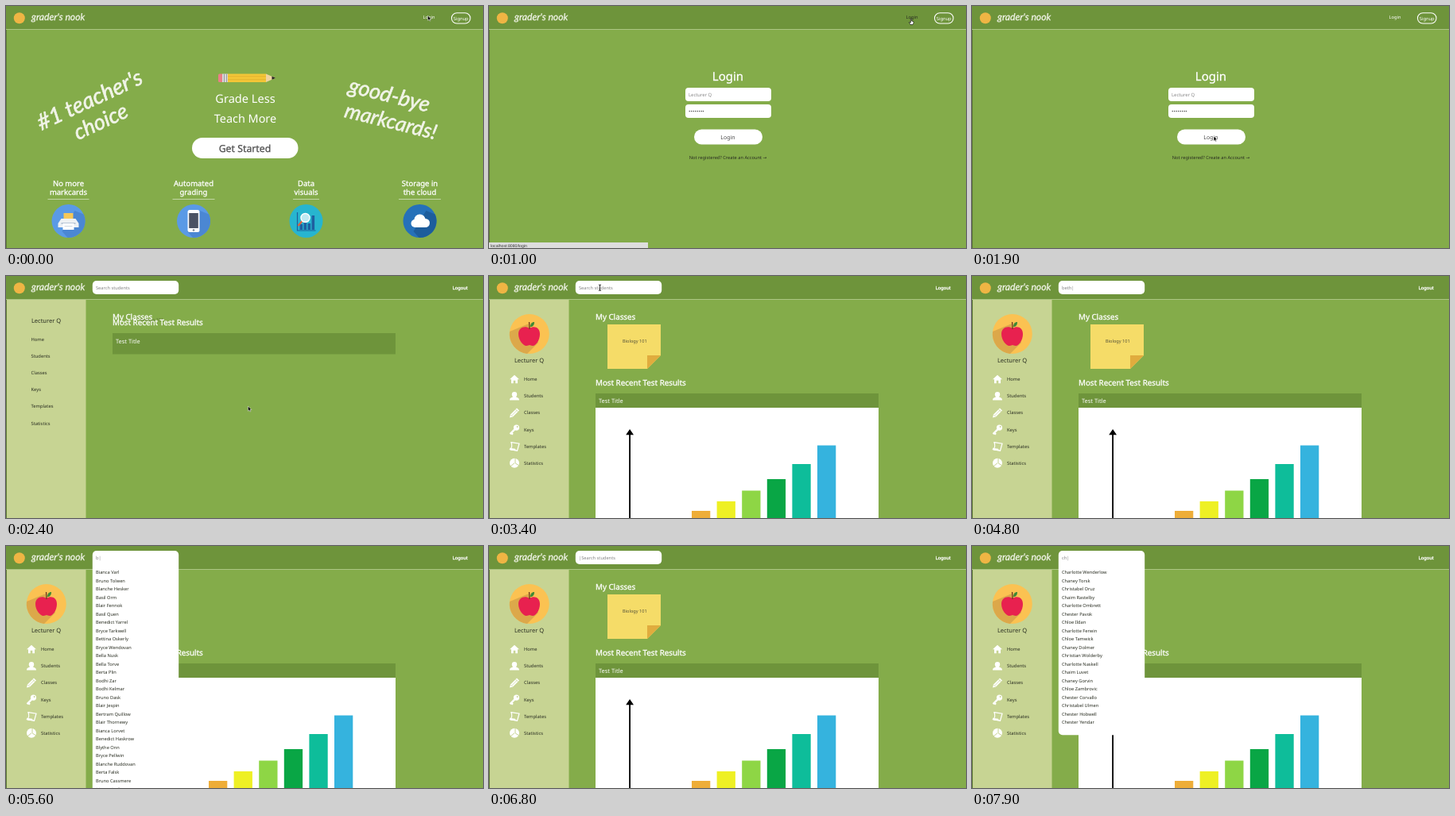
Write an HTML page that moves like this. It is 600 px wide and 305 px high and loops after 8000 ms.

```html
<!DOCTYPE html>
<html lang="en">
<head>
<meta charset="utf-8">
<title>Grading app walkthrough</title>
<style>
  html, body { margin: 0; width: 100%; height: 100%; overflow: hidden; background: #84ac4a; }
  svg { display: block; width: 100vw; height: 100vh; }
  text { font-family: "Noto Sans", "Open Sans", sans-serif; white-space: pre; text-rendering: geometricPrecision; }
  .hand { font-family: "Lato", cursive; font-style: italic; fill: #f1f4e8; stroke: #f1f4e8; stroke-width: .025em; }
  .mid { text-anchor: middle; }
  .firm { stroke: #fff; stroke-width: .3px; }
</style>
</head>
<body>
<svg id="stage" viewBox="0 0 600 305" preserveAspectRatio="none"></svg>
<script>
const LOOP = 8000;
const LOGIN_AT = 700, DASHBOARD_AT = 2200, LOADED_AT = 2700;
const HEADER = "#6e943b", INK = "#2a2e22", GREY = "#858585";
const stage = document.getElementById("stage");

const students = (
  "Bianca Varl,Bruno Tolwen,Blanche Hesker,Basil Orm,Blair Fennok,Basil Quen,Benedict Yarrel," +
  "Bryce Tarkwell,Bettina Oskerly,Bryce Wendovan,Bella Nusk,Bella Torve,Berta Plin,Bodhi Zar," +
  "Bodhi Kelmar,Bruno Dask,Blair Jespin,Bertram Quillow,Blair Thornewy,Bianca Lorvet," +
  "Benedict Haskrow,Blythe Onn,Bryce Pellwin,Blanche Ruddovan,Berta Falsk,Bruno Cassmere,Bianca Stelk," +
  "Charlotte Wenderlow,Chaney Torsk,Carmen Ollvey,Christabel Oruz,Chaim Rastelby,Charlotte Ombrett," +
  "Chester Pavok,Clara Mendrow,Chloe Ildan,Charlotte Ferwin,Chloe Tamwick,Corey Jannisk,Chaney Dolmer," +
  "Christian Wolderby,Charlotte Naskell,Cedric Woltan,Chaim Luvet,Chaney Gorvin,Chloe Zambrovic," +
  "Chester Corvallo,Clara Pensk,Christabel Ulmen,Chester Hobwell,Chester Yendar,Corey Haldrin"
).split(",");

// [time, search text]
const typing = [[0, ""], [4000, "b"], [4200, "be"], [4400, "bet"], [4600, "beth"],
  [5200, "bet"], [5400, "be"], [5500, "b"], [6000, ""], [7000, "c"], [7300, "ch"]];

// [time, x, y]
const pointerPath = [[0, 530.5, 12], [300, 531, 16], [1100, 531, 16], [1700, 304, 164],
  [2600, 304.5, 164], [3300, 139.5, 14.5], [LOOP, 139.5, 14.5]];

const rect = (x, y, w, h, fill, rx = 0, more = "") =>
  `<rect x="${x}" y="${y}" width="${w}" height="${h}" fill="${fill}" rx="${rx}" ${more}/>`;
const circle = (x, y, r, fill, more = "") => `<circle cx="${x}" cy="${y}" r="${r}" fill="${fill}" ${more}/>`;
const path = (d, fill, more = "") => `<path d="${d}" fill="${fill}" ${more}/>`;
const text = (x, y, size, fill, str, more = "") =>
  `<text x="${x}" y="${y}" font-size="${size}" fill="${fill}" ${more}>${str}</text>`;
const mid = (x, y, size, fill, str, style = "") => text(x, y, size, fill, str, `class="mid ${style}"`);
const group = (id, body) => `<g id="${id}">${body}</g>`;
const at = (x, y, body) => `<g transform="translate(${x} ${y})">${body}</g>`;
const scrawl = (x, y, angle, size, str) =>
  `<text class="hand mid" font-size="${size}" transform="translate(${x} ${y}) rotate(${angle})">${str}</text>`;

const pencil =
  rect(267, 85.5, 6, 10.5, "#ea7f86", 1.5) + rect(272, 85.5, 7, 10.5, "#d6d8d8") +
  rect(274, 85.5, 1, 10.5, "#9a9c9e") + rect(277, 85.5, 1, 10.5, "#9a9c9e") +
  rect(279, 85.5, 48, 10.5, "#f3c637") + rect(279, 88.5, 48, .7, "#d9a92c") + rect(279, 92.5, 48, .7, "#d9a92c") +
  path("M327 85.5L339 90.7L327 96Z", "#efd3a0") + path("M334.5 88.7L339 90.7L334.5 92.7Z", "#222");

// Round badge with a long shadow running to the lower right.
const badge = (fill, shade) => circle(0, 0, 21, fill) +
  path("M8 -13L19.2 -8.5A21 21 0 0 1 -1 21L-8 13Z", shade);
const printer = badge("#5a9ae6", "#4b87d3") + rect(-6, -10, 12, 9, "#f6c858") +
  path("M-9 -3H9L13 3V8H-13V3Z", "#eef1f4") + rect(-9, 2, 18, 2, "#b8c6d6") + rect(-7, 3, 14, 8, "#fff") +
  rect(-5, 6, 10, .8, "#c3cfdb");
const phone = badge("#5a9ae6", "#4b87d3") + rect(-7.5, -14, 15, 28, "#fbfcfd", 2.5) +
  rect(-5.8, -10, 11.6, 19, "#4a5263") + circle(0, 11.5, 1.3, "#7d8898");
const graph = circle(0, 0, 21, "#27b5cf") + path("M-11 -11V12H12", "none", 'stroke="#1f5f9c" stroke-width="1.2"') +
  [-8, -3, 2, 7].map((x, i) => rect(x, [4, 1, 3, -7][i], 3.6, [7, 10, 8, 18][i], "#1f5fa0")).join("") +
  path("M-5 0L-10 6", "none", 'stroke="#e2603c" stroke-width="2.2"') +
  circle(-1, -4, 5.5, "#bfe9f2", 'stroke="#fff" stroke-width="1.4"');
const cloud = badge("#2571b9", "#1d5d9c") + circle(-6, 3, 5, "#fff") + circle(0, -1.5, 7, "#fff") +
  circle(7, 2.5, 5.5, "#fff") + rect(-6, 1, 13, 7, "#fff");

const features = [
  [78.5, 26, "No more", "markcards", printer], [236, 26.5, "Automated", "grading", phone],
  [377.5, 16.5, "Data", "visuals", graph], [520.5, 26.5, "Storage in", "the cloud", cloud]
].map(([x, half, top, bottom, icon]) =>
  mid(x, 226.5, 9.5, "#fff", top, "firm") + mid(x, 237.5, 9.5, "#fff", bottom, "firm") +
  rect(x - half, 243, half * 2, 1, "#c2d5a4") + at(x, 271, icon)).join("");

const landing = scrawl(109, 127, -25, 28, "#1 teacher's") + scrawl(123, 154, -25, 27, "choice") +
  scrawl(480, 121, 14, 27, "good-bye") + scrawl(482, 154, 14, 26, "markcards!") + pencil +
  mid(301, 122, 14.6, "#fff", "Grade Less") + mid(301, 147, 14.4, "#fff", "Teach More") +
  rect(234, 166, 133.5, 26, "#fff", 13) +
  text(300.5, 184, 12.3, "#4c4c4c", "Get Started", 'class="mid" stroke="#4c4c4c" stroke-width=".25"') + features;

const login = mid(300.5, 94, 15, "#fff", "Login", "firm") +
  rect(247, 103, 108, 17, "#fff", 4) + text(251, 113.5, 5.9, GREY, "Lecturer Q") +
  rect(247, 124, 108, 17, "#fff", 4) + text(251, 135, 6.6, "#555", "••••••••") +
  rect(258, 155.5, 86, 19, "#fff", 9.5) + mid(300.5, 167.6, 7, "#4c4c4c", "Login") +
  mid(300.5, 193.3, 5.7, INK, "Not registered? Create an Account <tspan font-family=\"DejaVu Sans, sans-serif\">→</tspan>");

const menu = [
  ["Home", path("M-6 0L0 -5.5L6 0H4V5H1.3V1.5H-1.3V5H-4V0Z", "#fff")],
  ["Students", circle(0, -2.2, 3.2, "#fff") + path("M-6 5C-6 1 -2 2 -1.5 0H1.5C2 2 6 1 6 5Z", "#fff")],
  ["Classes", path("M-6 6L-5 2L3 -6L6 -3L-2 5Z", "#fff") + path("M-4.5 2.5L-2.5 4.5M1.5 -4.5L4.5 -1.5M-3 3L3.5 -3.5", "none", 'stroke="#c7d493" stroke-width=".7"')],
  ["Keys", path("M-5.5 5.5L1.5 -1.5M-4 4L-2 6", "none", 'stroke="#fff" stroke-width="2.2"') +
    circle(2.5, -2.5, 3.6, "#fff") + circle(3.6, -3.6, 1, "#c7d493")],
  ["Templates", path("M-4 -5L6 -3.5L3.5 5.5L-5.5 4Q-2 1 -4 -5Z", "none", 'stroke="#fff" stroke-width="1.2"') + path("M-6 2L1 3L2 5.5L-5 4.8Z", "#fff")],
  ["Statistics", circle(0, 0, 6, "#fff") + path("M1 -6V0L5.5 3M0 0L-5 4", "none", 'stroke="#c7d493" stroke-width="1"')]
];
const menuY = i => 130 + i * 21.1;

const avatar = circle(50.8, 73, 25, "#fbc252") +
  path("M50 60L26 70A25 25 0 0 0 48 98L62 84Z", "#dca84a") +
  path("M51 66C45 62 37 65 37 73C37 81 43 88 47 88C49 88 50 87 51 87C52 87 53 88 55 88C59 88 64 81 64 73C64 65 57 62 51 66Z", "#e8214f") +
  path("M51 67C51 63 51 61 50.5 58", "none", 'stroke="#6b3a20" stroke-width="1.3"') +
  path("M52 64C52 60 54 58 57 58C57 62 55 64 52 64Z", "#3f8a36");

const barColours = ["#eead38", "#eef024", "#8ed645", "#09a645", "#0ebd9a", "#35b3de"];
const barTops = [296, 284, 270.5, 256, 237, 213.5];
const chart = rect(134, 166, 356, 139, "#fff") + rect(176.2, 198, 1.8, 107, "#000") +
  path("M177.1 193L182 200.2H172.2Z", "#000") +
  barColours.map((fill, i) => rect(255 + i * 31.6, barTops[i], 23.3, 305 - barTops[i], fill)).join("");

const heading = (y, str) => text(134, y, 9.8, "#fff", str, 'class="firm"');

const pending = mid(50.5, 59.3, 7.5, INK, "Lecturer Q") +
  menu.map(([label], i) => text(31.5, menuY(i) - 48, 5.8, INK, label)).join("") +
  text(168, 56.5, 5.5, INK, "Biology 101", 'opacity=".45"') + heading(55.3, "My Classes") +
  heading(62, "Most Recent Test Results") +
  rect(134, 72, 356, 26.5, HEADER) + text(138, 84.6, 7.4, "#fff", "Test Title");

const loaded = avatar + mid(50.5, 109.3, 7.5, INK, "Lecturer Q") +
  menu.map(([label, icon], i) => at(32, menuY(i) + .3, icon) + text(44, menuY(i) + 2.2, 5.8, INK, label)).join("") +
  heading(55.3, "My Classes") + path("M149 61H216V100L199 117H149Z", "#f5dc68") +
  path("M199 117V100H216Z", "#e0ac3e") + text(168, 84, 5.6, "#55523a", "Biology 101") +
  heading(138, "Most Recent Test Results") + rect(134, 148, 356, 18, HEADER) +
  text(138, 160.2, 7.4, "#fff", "Test Title") + chart;

const dashboard = rect(1, 30, 99.5, 275, "#c7d493") + group("pending", pending) + group("loaded", loaded) +
  rect(108.8, 6, 108.4, 17, "#fff", 5, 'id="searchBox"') + group("results", "") +
  text(113, 16.6, 5.7, GREY, "", 'id="query"') + text(561.8, 16.5, 5.7, "#fff", "Logout", 'class="firm"');

const entry = text(524.5, 16.4, 5.7, "#fff", "Login", 'id="loginLink"') +
  rect(560.5, 8.7, 23.5, 13.3, "none", 6.6, 'stroke="#fff" stroke-width="1.1"') +
  mid(572.2, 17.5, 5.8, "#fff", "Signup");

const outline = 'stroke="#fff" stroke-width=".5"';
const pointers =
  group("arrow", path("M0 0V6.2L1.5 4.9L2.5 7L3.4 6.6L2.5 4.5H4.4Z", "#000", outline)) +
  group("finger", path("M-.6 0H.6V3L3 3.6V5.5L2 7.5H-1L-2.6 4.5L-.6 5Z", "#fff", 'stroke="#000" stroke-width=".6"')) +
  group("beam", path("M-1.5 -3.5Q0 -3.5 0 -2.7Q0 -3.5 1.5 -3.5M0 -3V3.5M-1.5 4Q0 4 0 3.2Q0 4 1.5 4", "none", 'stroke="#000" stroke-width=".8"'));

stage.innerHTML = rect(0, 0, 600, 305, "#84ac4a") + rect(0, 0, 600, 29, HEADER) +
  rect(0, 29, 600, 1, "#abc583") + rect(0, 30, 1, 275, "#5d7b35") +
  circle(16.8, 15.3, 7, "#efb544") + text(32, 18, 12.2, "#fff", "grader's nook", 'class="hand"') +
  group("landing", landing) + group("login", login) + group("entry", entry) + group("dashboard", dashboard) +
  group("status", rect(0, 298, 200, 7, "#dedede") +
    text(2, 303.6, 5.2, "#333", "localhost:8080/login", 'style="font-family:\'Liberation Sans\',sans-serif"')) +
  group("pointer", pointers);

const el = id => document.getElementById(id);
const show = (id, on) => { el(id).style.display = on ? "" : "none"; };

function pointerAt(t) {
  const i = pointerPath.findIndex(p => p[0] > t);
  const [t0, x0, y0] = pointerPath[i - 1], [t1, x1, y1] = pointerPath[i];
  const u = (t - t0) / (t1 - t0), k = u * u * (3 - 2 * u);
  return [x0 + (x1 - x0) * k, y0 + (y1 - y0) * k];
}

let lastQuery = null;
function drawSearch(t) {
  const query = typing.filter(([start]) => start <= t).pop()[1];
  const focused = t >= 3700;
  el("query").textContent = query ? query + "|" : (focused ? "|" : "") + "Search students";
  if (query === lastQuery) return;
  lastQuery = query;
  const hits = query ? students.filter(name => name.toLowerCase().startsWith(query)) : [];
  el("results").innerHTML = hits.map((name, i) => text(113, 35 + i * 10.52, 5.7, INK, name)).join("");
  el("searchBox").setAttribute("height", hits.length ? 32.4 + hits.length * 10.52 : 17);
}

function render(t) {
  const page = t < LOGIN_AT ? "landing" : t < DASHBOARD_AT ? "login" : "dashboard";
  for (const id of ["landing", "login", "dashboard"]) show(id, id === page);
  show("entry", page !== "dashboard");
  show("pending", t < LOADED_AT);
  show("loaded", t >= LOADED_AT);

  const hovering = t >= 300 && t < 1200;
  show("status", hovering);
  el("loginLink").setAttribute("fill", hovering ? INK : "#fff");

  const [x, y] = pointerAt(t);
  const inSearch = page === "dashboard" && x < 217 && y < 23;
  el("pointer").setAttribute("transform", `translate(${x} ${y})`);
  show("pointer", t < 4000);
  show("finger", hovering);
  show("beam", inSearch);
  show("arrow", !hovering && !inSearch);
  drawSearch(t);
}

const began = performance.now();
function tick() {
  render((performance.now() - began) % LOOP);
  requestAnimationFrame(tick);
}
tick();
</script>
</body>
</html>
```
